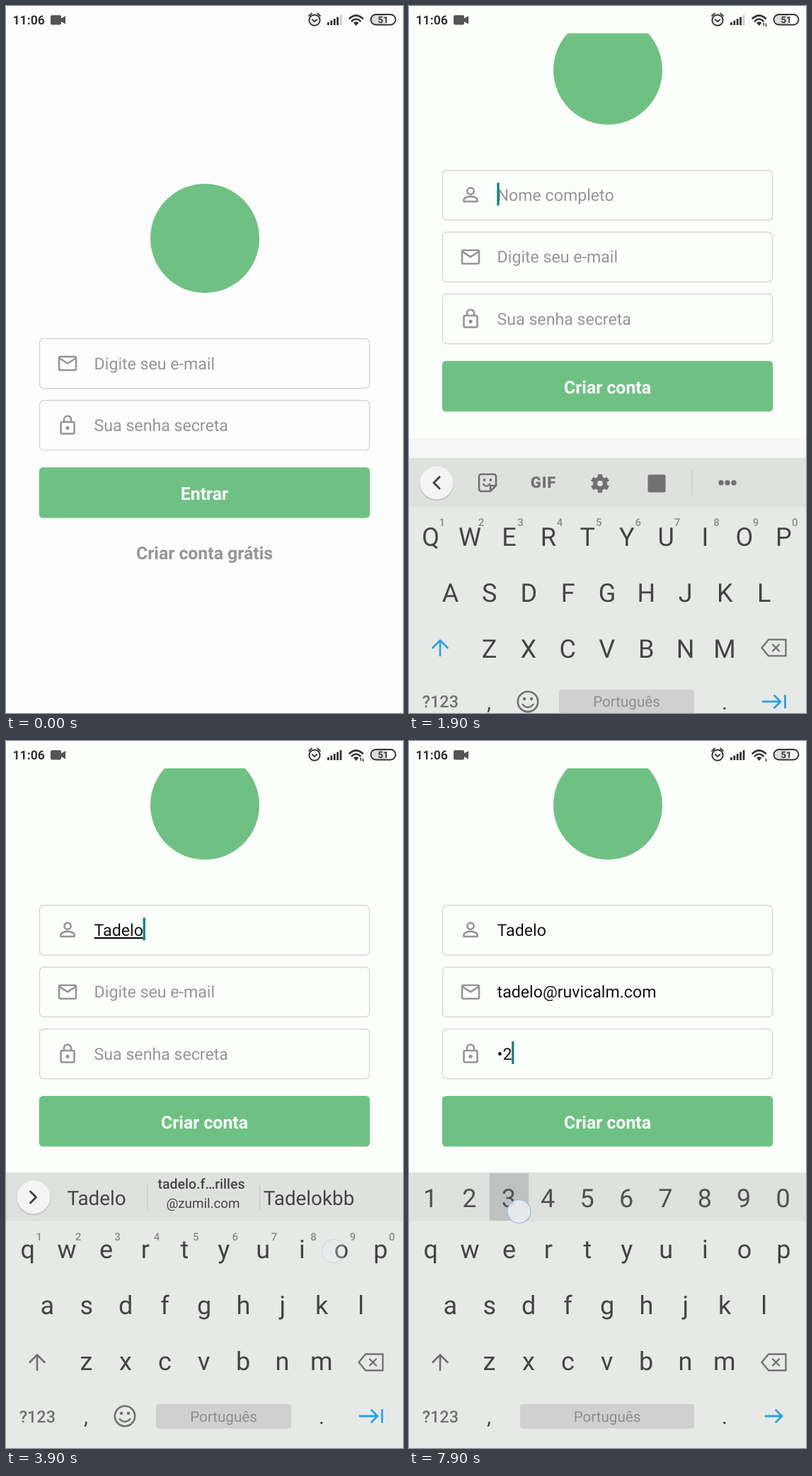
Write an HTML page that moves like this. It is 561 by 998 pixels and loops after 8 s.

```html
<!DOCTYPE html>
<html lang="pt">
<head>
<meta charset="utf-8">
<title>Criar conta</title>
<style>
  html, body { margin: 0; width: 100%; height: 100%; overflow: hidden; background: #fdfffd; }
  svg { display: block; width: 100%; height: 100%; }
  text { font-family: Roboto, "Noto Sans", sans-serif; white-space: pre; text-rendering: geometricPrecision; }
  .mid { text-anchor: middle; }
  .line { fill: none; stroke-linecap: round; stroke-linejoin: round; }
</style>
</head>
<body>
<svg id="stage" viewBox="0 0 561 998"></svg>
<script>
const LOOP = 8000, SCROLL = 194, GREEN = '#6fc183', GREY = '#959595', DARK = '#444', ICON = '#707170';
const BLUE = '#2ba2df', STRIP = '#dfe1df';
const NAME = 'Tadelo', MAIL = 'tadelo@ruvicalm.com';

// --- markup helpers
const text = (x, y, s, size, fill, extra = '') =>
  `<text x="${x}" y="${y}" font-size="${size}" fill="${fill}" ${extra}>${s}</text>`;
const mid = (x, y, s, size, fill, weight = 400, extra = '') =>
  text(x, y, s, size, fill, `class="mid" font-weight="${weight}" ${extra}`);
const rect = (x, y, w, h, fill, extra = '') =>
  `<rect x="${x}" y="${y}" width="${w}" height="${h}" fill="${fill}" ${extra}/>`;
const dot = (x, y, r, fill, extra = '') =>
  `<circle cx="${x}" cy="${y}" r="${r}" fill="${fill}" ${extra}/>`;
const line = (d, color, w = 2.5, extra = '') =>
  `<path class="line" d="${d}" stroke="${color}" stroke-width="${w}" ${extra}/>`;
const group = (id, body) => `<g id="${id}">${body}</g>`;
const at = (x, y, body) => `<g transform="translate(${x} ${y})">${body}</g>`;

// --- form parts
const user = dot(0, -5.8, 4.6, 'none', `stroke="${GREY}" stroke-width="2.6"`) +
  line('M-9.5 9V6.5C-9.5 3.2-3 1.9 0 1.9S9.5 3.2 9.5 6.5V9Z', GREY, 2.6);
const mail = rect(-12, -9.5, 24, 19, 'none', `rx="2" stroke="${GREY}" stroke-width="2.6"`) +
  line('M-11-7L0 0L11-7', GREY, 2.6);
const lock = rect(-9.5, -4.5, 19, 16.5, 'none', `rx="2" stroke="${GREY}" stroke-width="2.6"`) +
  line('M-5-4.5V-8a5 5 0 0 1 10 0V-4.5', GREY, 2.6) + dot(0, 3.8, 2.6, GREY);

const field = (y, icon, hint, id) =>
  rect(47.4, y, 466.2, 70.3, 'none', 'rx="6" stroke="#d5d7d5" stroke-width="1.4"') +
  at(87, y + 35, icon) +
  text(124.6, y + 43, hint, 23.15, GREY, id ? `id="hint${id}"` : '') +
  (id ? text(124.6, y + 43, '', 23.15, '#111', `id="value${id}"`) : '');
const button = (y, label) =>
  rect(46.75, y, 467.5, 71.5, GREEN, 'rx="5.5"') + mid(280.5, y + 46, label, 24.8, '#fff', 700);

const login = dot(281, 328, 77, GREEN) +
  field(469.5, mail, 'Digite seu e-mail') +
  field(556.8, lock, 'Sua senha secreta') +
  button(651.2, 'Entrar') +
  group('link', mid(280.5, 780.5, 'Criar conta grátis', 24.8, GREY, 700));

const register = dot(281, 284.5, 77, GREEN) +
  field(426, user, 'Nome completo', 1) +
  field(513.2, mail, 'Digite seu e-mail', 2) +
  field(600.5, lock, 'Sua senha secreta', 3) +
  button(695, 'Criar conta') +
  mid(280.5, 824, 'Já tenho conta', 24.8, GREY, 700) +
  rect(0, 0, 3.3, 32, '#0f8577', 'id="cursor"');

// --- status bar
const bars = [0, 1, 2, 3, 4].map(i =>
  rect(454 + i * 4.4, 23 - i * 2.5, 2.8, 4 + i * 2.5, '#333', i == 4 ? 'id="bar"' : '')).join('');
const battery = rect(515.5, 12, 35, 14.5, '#fdfffd', 'rx="7.2"') +
  '<path d="M536 12H522.700a7.200 7.200 0 0 0 0 14.500H536Z" fill="#dcdedc"/>' +
  rect(515.5, 12, 35, 14.5, 'none', 'rx="7.2" stroke="#333" stroke-width="2"') +
  mid(533, 24.2, '51', 13, '#333', 700);
const wifi = line('M485.500 17.500q9.200-8.400 18.400 0M488.700 21.200q6-5.400 12 0', '#333', 2.6) +
  '<path d="M494.700 28l-3.800-4.400q3.800-2.800 7.600 0Z" fill="#333"/>';
const status = rect(0, 0, 561, 38.5, '#fdfffd', 'id="top"') +
  text(9.5, 26, '11:06', 17.6, '#333', 'font-weight="700"') +
  rect(63, 13, 15, 13.5, '#555', 'rx="2"') + '<path d="M77 18l7-4v11.500l-7-4Z" fill="#555"/>' +
  dot(436, 20, 7.6, 'none', 'stroke="#333" stroke-width="2"') +
  line('M428 14l4-3.500M444 14l-4-3.500M432.500 19l3.500 3 3.500-3', '#333', 1.8) +
  bars + wifi +
  group('up', line('M501.500 28v-4l-1 1.300', '#333', 1.1)) +
  group('down', line('M504.300 24.500v4l1-1.300', '#333', 1.1)) +
  battery;

// --- keyboard
const ROWS = [['qwertyuiop', 30.7, 730], ['asdfghjkl', 58.4, 809], ['zxcvbnm', 113.5, 888]];
const STEP = 55.4;
const keys = up => ROWS.map(([row, x, y]) => [...row].map((c, i) =>
  mid(x + i * STEP, y + (up ? 3 : 0), up ? c.toUpperCase() : c, 36, DARK)).join('')).join('');
const digits = (x, y, size, fill, weight) => [...'1234567890'].map((c, i) =>
  mid(x + i * STEP, y, c, size, fill, weight)).join('');
const divider = x => rect(x - .5, 626, 1.2, 36, '#c6c7c6');

const gear = dot(0, 0, 7, 'none', `stroke="${ICON}" stroke-width="6"`) +
  [0, 60, 120].map(a => `<path d="M0-13V-9M0 9V13" stroke="${ICON}" stroke-width="6.5" transform="rotate(${a})"/>`).join('');
const sticker = line('M-9-12H9a3 3 0 0 1 3 3V4L4 12H-9a3 3 0 0 1-3-3V-9a3 3 0 0 1 3-3ZM4 11V4H11', ICON, 2.6) +
  dot(-4.5, -4, 2, ICON) + dot(4.5, -4, 2, ICON) + line('M-6 2q5 6 9-.5', ICON, 2.2);
const palette = `<path d="M0-13a13 13 0 1 0 0 26c3 0 3-3 2-5s0-4 3-4h4c3 0 5-2 5-5C14-8 7-13 0-13Z" fill="${ICON}"/>` +
  [[-8, 0], [-4, -6], [4, -6], [8, 0]].map(([x, y]) => dot(x, y, 2.2, STRIP)).join('');
const clipboard = rect(-10.5, -10.5, 21, 23, 'none', `rx="2" stroke="${ICON}" stroke-width="2.6"`) +
  rect(-6, -14, 12, 6, ICON, 'rx="2"') + line('M-5-3H5M-5 2H5M-5 7H2', ICON, 2.2);
const square = rect(-12.5, -12.5, 25, 25, ICON, 'rx="2"');
const more = divider(400) + [441, 450, 459].map(x => dot(x, 644, 3.7, ICON)).join('');

const tools1 = at(111, 644, sticker) +
  mid(190, 651.5, 'GIF', 22, ICON, 900, 'letter-spacing="1"') +
  at(270, 645, gear) + at(350, 645, square) + more;
const tools2 = at(111.5, 645, gear) + at(191.5, 645, square) + at(271, 644, palette) + at(349.5, 644, clipboard) + more;
const words = divider(199.5) + divider(358.5) +
  group('sug', [128, 279, 428].map(x => mid(x, 655, '', 27.8, DARK)).join('')) +
  group('contact', mid(276, 631.5, 'tadelo.f…rilles', 19.5, DARK, 500) + mid(278.5, 658.5, '@zumil.com', 18.8, DARK));
const round = dot(39, 645.5, 24, '#000', 'opacity=".13"') + dot(39, 644, 23.5, '#f3f4f3') +
  group('left', line('M43 636l-8 8 8 8', DARK, 3)) + group('right', line('M34.5 636l8 8-8 8', DARK, 3));

const face = dot(168, 953, 14.2, 'none', `stroke="${ICON}" stroke-width="2.6"`) +
  dot(163, 949, 2.2, ICON) + dot(173, 949, 2.2, ICON) + line('M160.5 957q7.5 8 15 0', ICON, 2.4);
const keyboard = rect(0, 609, 561, 389, '#e7e9e7') + rect(0, 609, 561, 69, STRIP) +
  rect(0, 0, STEP, 67, '#bfc1c0', 'id="press"') +
  group('upper', keys(true)) + group('lower', keys(false)) +
  group('hints', digits(46.7, 704.7, 15, '#8a8b8a', 500)) +
  group('numbers', digits(30, 658, 36, '#505150', 400)) +
  group('strip', group('tools1', tools1) + group('tools2', tools2) + group('words', words) + round) +
  line('M44 888V867M33.5 877L44 866.5 54.5 877', ICON, 2.6, 'id="shift"') +
  line('M498.5 877L508 865.5H532.5V888.5H508ZM514 872.5l9 9M523 872.5l-9 9', ICON, 2.3) +
  text(18.7, 961.5, '?123', 23.4, ICON, 'font-weight="500"') +
  mid(113, 964, ',', 30, DARK, 400, 'id="comma"') +
  group('face', face) +
  rect(212, 936, 191, 34.5, '#cfd0cf', 'rx="4" id="space"') +
  mid(307.5, 960.5, 'Português', 20.6, '#8d8e8d', 400, 'id="lang"') +
  mid(446, 964, '.', 30, DARK) +
  group('next', line('M500 953H525M516.5 944.5L525 953l-8.5 8.5M531.5 944.5V961.5', BLUE, 2.8)) +
  group('done', line('M504 953H527M518.5 944.5L527 953l-8.5 8.5', BLUE, 2.8));

// --- long-press menu
const menu = rect(26, 214, 252, 82, '#000', 'rx="8" opacity=".28" filter="url(#blur)"') +
  rect(26.5, 212.5, 251.5, 81.5, '#f6f6f6', 'rx="8" stroke="#cfcfcf"') +
  rect(107.5, 213, 1, 81, '#c4c4c4') +
  mid(67, 260.5, 'Paste', 17.6, '#111') + mid(193.5, 260.5, 'Frequent phrases', 17.6, '#111');

document.getElementById('stage').innerHTML =
  '<defs><filter id="blur" x="-20%" y="-40%" width="140%" height="180%"><feGaussianBlur stdDeviation="7"/></filter></defs>' +
  rect(0, 0, 561, 998, '#fdfffd', 'id="page"') +
  group('login', login) + group('register', register) +
  group('under', rect(0, 610, 561, 388, '#f7f6f7')) + status +
  group('menu', menu) + group('keyboard', keyboard) +
  dot(0, 0, 16.5, '#edf0f1', 'id="touch" fill-opacity=".85" stroke="#9db9d6" stroke-width="1.2"');

// --- timeline
const RESIZE = 1700, TO_MAIL = 4400, PASTED = 6000, TO_PASS = 6700;
const TYPED = [2500, 2900, 3100, 3300, 3500, 3800];
const PASS = [7300, 7600];
const WAKE = [RESIZE, ...TYPED, TO_MAIL, 5300, PASTED, TO_PASS, ...PASS];
// start, end, x, y, pressed key
const TAPS = [
  [550, 850, 281, 785], [1400, 1600, 250, 465],
  [2400, 2500, 246, 722, 't'], [2850, 2950, 62, 800, 'a'], [3050, 3150, 163, 800, 'd'],
  [3250, 3350, 138, 722, 'e'], [3430, 3500, 492, 800, 'l'], [3700, 3800, 463, 720, 'o'],
  [4200, 4450, 487, 955], [5200, 5350, 366, 367], [5800, 5950, 67, 258],
  [6500, 6750, 487, 955],
  [7200, 7350, 20, 664, '1'], [7500, 7650, 97, 664, '2'], [7850, 8100, 155.5, 664, '3']
];

const $ = id => document.getElementById(id);
const show = (id, on) => { $(id).style.display = on ? '' : 'none'; };
const set = (id, attrs) => { for (const k in attrs) $(id).setAttribute(k, attrs[k]); };
const ramp = (t, a, b) => Math.min(1, Math.max(0, (t - a) / (b - a)));
const count = (list, t) => list.filter(x => x <= t).length;

function cell(key) {
  if (key <= '9') return [30.7 + (key - 1) * STEP, 643.5];
  const r = ROWS.findIndex(row => row[0].includes(key));
  return [ROWS[r][1] + ROWS[r][0].indexOf(key) * STEP, 718 + r * 79];
}

function write(n, value, underline) {
  const el = $('value' + n);
  if (el.textContent !== value) el.textContent = value;
  el.setAttribute('text-decoration', underline ? 'underline' : 'none');
  show('hint' + n, !value);
}

function drawForm(t) {
  const first = t < 1000, bg = first ? '#fefdfe' : '#fdfffd';
  set('page', { fill: bg });
  set('top', { fill: bg });
  show('login', first);
  show('register', !first);
  show('under', t >= RESIZE);
  set('link', { opacity: 1 - .7 * ramp(t, 650, 750) * (1 - ramp(t, 850, 1000)) });
  set('register', { transform: `translate(0 ${t < RESIZE ? 0 : -SCROLL})` });

  write(1, NAME.slice(0, count(TYPED, t)), t < TO_MAIL);
  write(2, t < PASTED ? '' : MAIL, false);
  write(3, ['', '1', '•2'][count(PASS, t)], false);

  const focus = t < TO_MAIL ? 1 : t < TO_PASS ? 2 : 3;
  const last = WAKE[count(WAKE, t) - 1];
  const lit = t >= RESIZE && Math.floor((t - last) / 500) % 2 === 0;
  show('cursor', lit);
  if (lit) set('cursor', {
    x: 124.3 + $('value' + focus).getComputedTextLength(),
    y: 443.5 + (focus - 1) * 87.25
  });
}

function drawKeyboard(t) {
  const caps = t < TYPED[0], pass = t >= TO_PASS, inMail = t >= TO_MAIL && !pass;
  show('keyboard', t >= 1600);
  set('keyboard', { transform: `translate(0 ${389 * Math.pow(1 - ramp(t, 1600, 2050), 2.35)})` });
  show('upper', caps);
  show('lower', !caps);
  set('shift', { stroke: caps ? BLUE : ICON });
  show('hints', !pass);
  show('numbers', pass);
  show('strip', !pass);
  const typing = !caps && t < TO_MAIL;
  show('tools1', caps);
  show('words', typing);
  show('tools2', inMail);
  show('right', typing);
  show('left', !typing);

  const n = count(TYPED, t), full = n === NAME.length;
  const list = [NAME.slice(0, n), full ? '' : 'Tá', full ? 'Tadelokbb' : 'Tô'];
  list.forEach((s, i) => {
    const el = $('sug').children[i];
    if (el.textContent !== s) el.textContent = s;
  });
  show('contact', full);

  $('comma').textContent = inMail ? '@' : ',';
  set('comma', { 'font-size': inMail ? 28 : 30 });
  show('face', !pass);
  set('space', { x: pass ? 157 : 212, width: pass ? 246 : 191 });
  set('lang', { x: pass ? 280 : 307.5 });
  show('next', !pass);
  show('done', pass);
}

function drawTouch(t) {
  const tap = TAPS.filter(a => a[0] <= t).pop();
  const alpha = tap ? 1 - ramp(t, tap[1], tap[1] + 150) : 0;
  show('touch', alpha > 0);
  if (alpha > 0) set('touch', { cx: tap[2], cy: tap[3], opacity: alpha });
  const held = tap && tap[4] && t < tap[1];
  show('press', held);
  if (held) {
    const [x, y] = cell(tap[4]);
    set('press', { x: x - STEP / 2, y: y - 33.5 });
  }
}

function draw(t) {
  drawForm(t);
  drawKeyboard(t);
  drawTouch(t);
  set('menu', { opacity: ramp(t, 5350, 5480) * (1 - ramp(t, 5950, 6100)) });
  set('bar', { fill: t < TYPED[0] ? '#c9cbc9' : '#333' });
  show('up', t >= 1000 && t < 7400);
  show('down', t >= 1000);
}

const start = performance.now();
function tick() {
  draw((performance.now() - start) % LOOP);
  requestAnimationFrame(tick);
}
tick();
</script>
</body>
</html>
```
